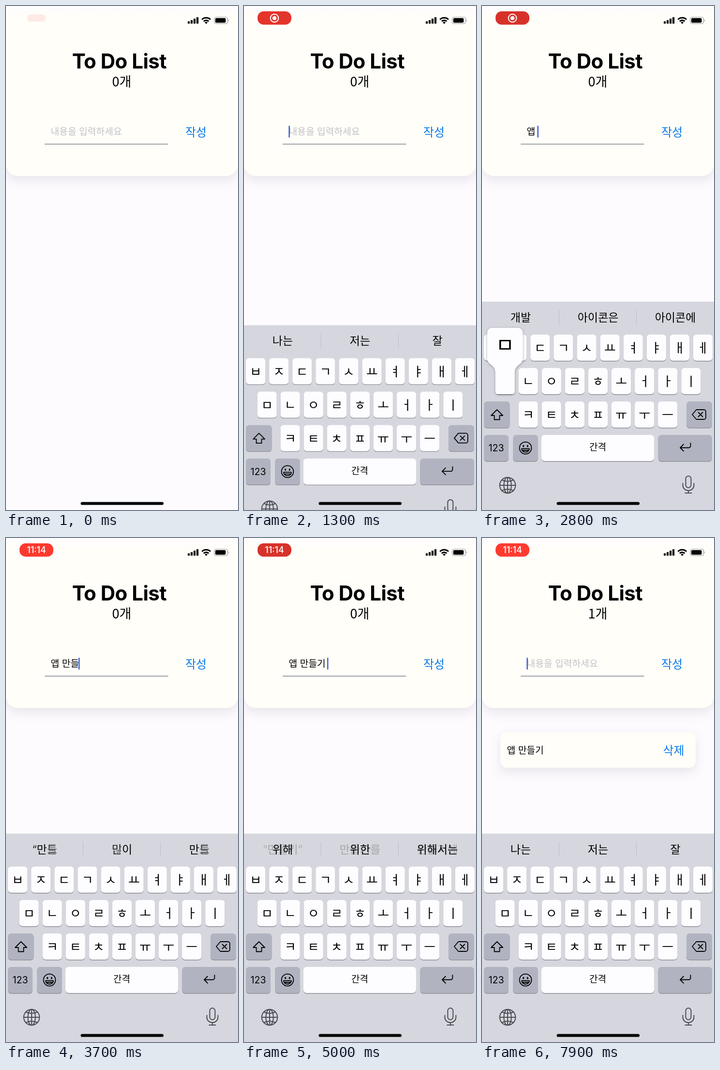
Animation, 480 px wide and 1040 px high, one loop 8 s. Source, as an HTML page:

```html
<!DOCTYPE html>
<html lang="ko">
<head>
<meta charset="utf-8">
<title>To Do List</title>
<style>
  html, body { margin: 0; width: 100%; height: 100%; overflow: hidden; background: #fdfbfe; }
  svg { display: block; width: 100vw; height: 100vh; }
  text { font-family: "Noto Sans CJK KR", "Noto Sans CJK", sans-serif; font-weight: 350; text-anchor: middle; }
  .latin { font-family: Inter, "Noto Sans CJK KR", sans-serif; font-weight: 400; }
  .body { font-size: 19.3px; text-anchor: start; }
  .link { font-size: 24px; fill: #0a7aea; }
  .jamo { font-size: 26px; font-weight: 400; }
  .sug { font-family: Inter, "Noto Sans CJK KR", sans-serif; font-size: 23px; }
  .line { fill: none; stroke: #000; stroke-width: 1.8; stroke-linecap: round; stroke-linejoin: round; }
  .gray { stroke: #4b4c53; stroke-width: 2; }
  .sheet { fill: #fffef9; filter: drop-shadow(0 9px 11px rgba(50, 40, 70, .1)); }
  #popup path { fill: #fdfcff; filter: drop-shadow(0 1px 2px rgba(0, 0, 0, .35)); }
  #popup text { font-size: 42px; font-weight: 400; }
</style>
</head>
<body>
<svg viewBox="0 0 480 1040">
  <defs>
    <linearGradient id="top" x2="0" y2="1">
      <stop stop-color="#fefcfe"/><stop offset="1" stop-color="#fffef9"/>
    </linearGradient>
  </defs>
  <rect width="480" height="1040" fill="#fdfbfe"/>
  <path class="sheet" d="M0 0H480V326a25 25 0 0 1-25 25H25a25 25 0 0 1-25-25z"/>
  <rect width="480" height="22" fill="url(#top)"/>

  <g id="pill">
    <rect id="pillBack" x="28" y="11" width="70" height="27.5" rx="12.5"/>
    <g id="record">
      <circle cx="63" cy="25" r="8.3" fill="none" stroke="#fff" stroke-width="2"/>
      <circle cx="63" cy="25" r="4.3" fill="#fff"/>
    </g>
    <text id="clock" class="latin" x="63" y="31.3" font-size="18" fill="#fff" style="font-weight:500">11:14</text>
  </g>

  <g id="bars"></g>
  <g fill="none" stroke="#000" stroke-width="3">
    <path d="M405.4 28a12.4 12.4 0 0 1 17.6 0M409 31.6a7.4 7.4 0 0 1 10.4 0"/>
    <path d="M411.2 34a4.3 4.3 0 0 1 6 0l-3 3z" fill="#000" stroke="none"/>
  </g>
  <rect x="431" y="23" width="27.5" height="13.5" rx="4" fill="none" stroke="#96969a" stroke-width="1.2"/>
  <rect x="433" y="25" width="21.5" height="9.5" rx="2.3"/>
  <path d="M460 27.5q2.4 2.3 0 4.6z" fill="#96969a"/>

  <text class="latin" x="234.5" y="129" font-size="42" style="font-weight:700;letter-spacing:-.012em">To Do List</text>
  <text id="count" x="239.5" y="166" font-size="27"></text>
  <path d="M80 285H335.5" stroke="#85858b" stroke-width="1.5"/>
  <text id="field" class="body" x="92.5" y="266.3"></text>
  <rect id="caret" y="247" width="2.6" height="24.5" rx="1" fill="#3f64dc"/>
  <text id="add" class="link" x="393" y="268.8">작성</text>

  <g id="item">
    <rect class="sheet" x="38" y="402" width="404" height="72" rx="13"/>
    <text class="body" x="51.5" y="444.8">앱 만들기</text>
    <text class="link" x="396.5" y="447">삭제</text>
  </g>

  <g id="keyboard">
    <rect y="610" width="480" height="430" fill="#d6d7de"/>
    <path d="M159.5 627V658M319.5 627V658" stroke="#bcbdc6"/>
    <g id="sugs"></g>
    <g id="keys"></g>
    <text class="latin" x="29.5" y="919" font-size="19.5">123</text>
    <text x="239.5" y="917.3" font-size="19">간격</text>
    <path class="line" d="M31 833l12 12h-6.5v8.5h-11v-8.5H19z"/>
    <path class="line" d="M443.5 833H459a4 4 0 0 1 4 4v12a4 4 0 0 1-4 4H443.5l-8.5-10zM447.5 838.5l9 9m0-9l-9 9"/>
    <path class="line" d="M431.5 902v6a3.5 3.5 0 0 1-3.5 3.5H410m7-7l-7 7l7 7"/>
    <circle class="line" cx="90" cy="912" r="12.4"/>
    <ellipse cx="85.7" cy="908" rx="1.6" ry="2.2"/>
    <ellipse cx="94.3" cy="908" rx="1.6" ry="2.2"/>
    <path class="line" d="M82 913.5h16a8 7 0 0 1-16 0zM83 917h14"/>
    <g class="line gray">
      <circle cx="53" cy="989" r="16.3"/>
      <ellipse cx="53" cy="989" rx="7.8" ry="16.3"/>
      <path d="M53 973v32M37 989h32M41 978q12 6 24 0M41 1000q12-6 24 0"/>
    </g>
    <g class="line gray">
      <rect x="421.5" y="970" width="11" height="24" rx="5.5"/>
      <path d="M415.5 985v4a11.5 11 0 0 0 23 0v-4M427 1000v5M420.5 1005h13"/>
    </g>
    <g id="popup"><path/><text></text></g>
  </g>
  <rect x="154.5" y="1023.4" width="171.5" height="6.2" rx="3.1"/>
</svg>

<script>
const $ = id => document.getElementById(id);
const clamp = v => Math.max(0, Math.min(1, v));
const LOOP = 8000, FOCUS = 1000, SLIDE = 1097, SUBMIT = 7320, FADE = 250, HOLD = 130, INSERT = 90;

// [press time, key, field text after it]
const presses = [
  [1960, 'ㅇ', 'ㅇ'], [2140, 'ㅐ', '애'], [2320, 'ㅂ', '앱'], [2480, ' ', '앱 '],
  [2760, 'ㅁ', '앱 ㅁ'], [2920, 'ㅏ', '앱 마'], [3070, 'ㄴ', '앱 만'], [3220, 'ㄷ', '앱 만ㄷ'],
  [3370, 'ㅡ', '앱 만드'], [3520, 'ㄹ', '앱 만들'], [4180, 'ㄱ', '앱 만듥'],
  [4350, 'ㅣ', '앱 만들기'], [4740, ' ', '앱 만들기 ']
];
const edits = [[FOCUS, ''], ...presses.map(([t, , s]) => [t + INSERT, s]), [SUBMIT, '']];

const suggestions = [
  [-FADE, '나는', '저는', '잘'],
  [2080, '“ㅇ”', '아', '안'],
  [2240, '“애”', '애들', '애가'],
  [2420, '“앱”', '앱을', '앱이'],
  [2545, '개발', '아이콘은', '아이콘에'],
  [2880, '“ㅁ”', '만', '많이'],
  [3040, '“마”', '마음', '마지막'],
  [3190, '“만”', '많이', '만나'],
  [3370, '“만드', '민이', '만드'],
  [3620, '“만들', '많이', '만들'],
  [4300, '“만듥”', '만들', '만들고'],
  [4480, '“만들기”', '만들기를', '만들기에'],
  [4845, '위해', '위한', '위해서는'],
  [SUBMIT, '나는', '저는', '잘']
];

const keys = {};
let keyMarkup = '';
function addKey(x, y, w, fill, name = '') {
  const box = (dy, color, id) =>
    `<rect ${id} x="${x}" y="${y + dy}" width="${w}" height="54" rx="6.5" fill="${color}"/>`;
  keyMarkup += box(1.4, '#8e9097', '') + box(0, fill, name === ' ' ? 'id="space"' : '');
  if (name.trim()) keyMarkup += `<text class="jamo" x="${x + w / 2}" y="${y + 37}">${name}</text>`;
  keys[name] = { x, y, w };
}
const LIGHT = '#fdfcff', DARK = '#b1b4c0';
[['ㅂㅈㄷㄱㅅㅛㅕㅑㅐㅔ', 4], ['ㅁㄴㅇㄹㅎㅗㅓㅏㅣ', 27.5], ['ㅋㅌㅊㅍㅠㅜㅡ', 75.5]]
  .forEach(([row, x0], r) => [...row].forEach((c, i) => addKey(x0 + 48.1 * i, 678 + 69 * r, 40.2, LIGHT, c)));
for (const [x, y, w] of [[4, 816, 53.5], [423, 816, 53], [4, 885, 51], [64, 885, 52], [364.5, 885, 111.5]])
  addKey(x, y, w, DARK);
addKey(123, 885, 233, LIGHT, ' ');
$('keys').innerHTML = keyMarkup;

$('bars').innerHTML = [5, 7.5, 10.5, 13.5].map((h, i) =>
  `<rect x="${376 + 6 * i}" y="${36.5 - h}" width="4.2" height="${h}" rx="1"/>`).join('');
$('sugs').innerHTML = [80, 240, 400].map(x =>
  `<text class="sug" x="${x}" y="650.5"></text>`.repeat(2)).join('');
const sugTexts = [...$('sugs').children];
const [popPath, popText] = $('popup').children;

const lastBefore = (list, t) => list.findLastIndex(e => e[0] <= t);

function drawPill(t) {
  const p = clamp(t / 450) - 1;
  const scale = .54 + .46 * (1 + 2.7 * p ** 3 + 1.7 * p ** 2);
  const bright = .5 + .5 * Math.cos((t - 1900) / 1000 * Math.PI);
  $('pill').setAttribute('transform', `translate(63 24.7) scale(${scale}) translate(-63 -24.7)`);
  $('pill').style.opacity = clamp(.09 + t / 280);
  $('pillBack').style.fill = `rgb(${214 + 41 * bright},${50 + 9 * bright},${42 + 6 * bright})`;
  const swap = clamp((t - 3200) / 200);
  $('record').style.opacity = clamp(t / 200) * (1 - swap);
  $('clock').style.opacity = swap;
}

function drawField(t) {
  const i = lastBefore(edits, t);
  const text = i < 0 ? '' : edits[i][1];
  $('field').textContent = text || '내용을 입력하세요';
  $('field').style.fill = text ? '#000' : '#c3c2c6';
  const width = [...text].reduce((w, c) => w + (c === ' ' ? 4.3 : 17.76), 0);
  $('caret').setAttribute('x', 92.3 + width);
  const e = i < 0 ? 0 : (t - edits[i][0]) % 1000;
  $('caret').style.opacity = i < 0 ? 0 : Math.max(clamp((700 - e) / 100), clamp((e - 900) / 100));
}

// Words crossfade, but letters that stay in place keep full strength.
function drawSuggestions(t) {
  const i = lastBefore(suggestions, t);
  const k = clamp((t - suggestions[i][0]) / FADE);
  sugTexts.forEach((el, n) => {
    const cell = 1 + (n >> 1), isOld = n % 2 === 0;
    const before = suggestions[Math.max(0, i - 1)][cell], after = suggestions[i][cell];
    const sameLength = before.length === after.length;
    const alpha = isOld ? (1 - k) ** 1.5 : clamp(1.6 * k);
    el.innerHTML = [...(isOld ? before : after)].map((c, j) => {
      const kept = sameLength && before[j] === after[j];
      return `<tspan fill-opacity="${kept ? +!isOld : alpha}">${c}</tspan>`;
    }).join('');
  });
}

function drawPress(t) {
  const press = presses.find(([s]) => t >= s && t < s + HOLD);
  const name = press ? press[1] : '';
  $('space').style.fill = name === ' ' ? DARK : LIGHT;
  const shown = name.trim() !== '';
  $('popup').style.display = shown ? '' : 'none';
  if (!shown) return;
  const { x, y, w } = keys[name];
  const l = Math.max(2, Math.min(404, x + w / 2 - 37)), r = l + 74, e = x + w;
  popPath.setAttribute('d', `M${l + 12} ${y - 83}H${r - 12}q12 0 12 12V${y - 20}
    C${r} ${y - 6} ${e} ${y - 8} ${e} ${y + 10}V${y + 48}q0 6-6 6H${x + 6}q-6 0-6-6V${y + 10}
    C${x} ${y - 8} ${l} ${y - 6} ${l} ${y - 20}V${y - 71}q0-12 12-12z`);
  popText.textContent = name;
  popText.setAttribute('x', l + 37);
  popText.setAttribute('y', y - 32);
}

function draw(now) {
  const t = now % LOOP;
  drawPill(t);
  drawField(t);
  drawSuggestions(t);
  drawPress(t);
  // critically damped slide
  const s = Math.max(0, t - SLIDE) * .0183;
  $('keyboard').setAttribute('transform', `translate(0 ${t > 1900 ? 0 : 430 * (1 + s) * Math.exp(-s)})`);
  $('keyboard').style.display = t < SLIDE ? 'none' : '';
  $('add').style.opacity = t < 7100 ? 1 : .2 + .8 * clamp((t - 7300) / 200);
  const done = t >= SUBMIT;
  $('count').textContent = done ? '1개' : '0개';
  $('item').style.display = done ? '' : 'none';
}

const start = performance.now();
function tick() {
  draw(performance.now() - start);
  requestAnimationFrame(tick);
}
tick();
</script>
</body>
</html>
```
